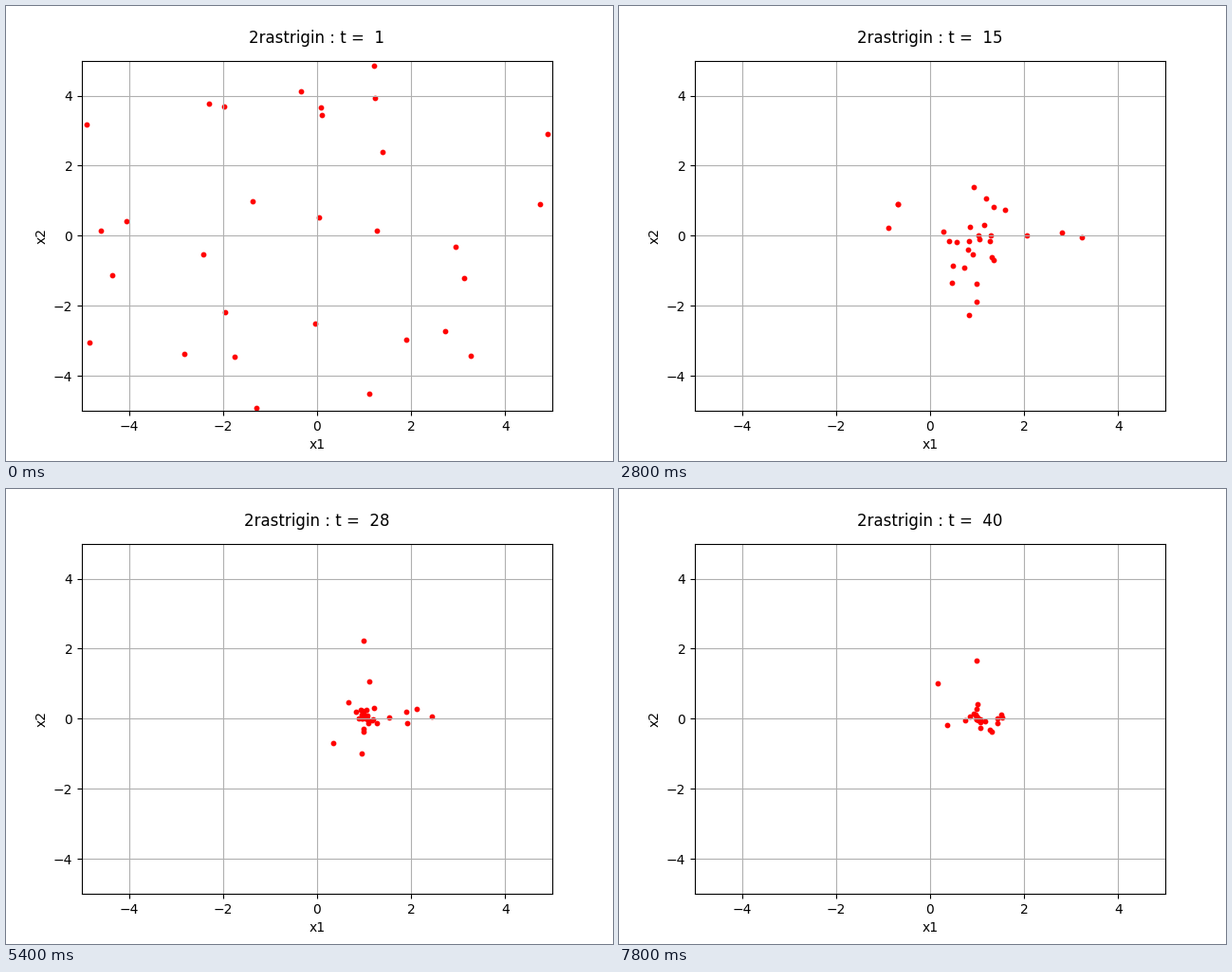
Animation, 640 px wide and 480 px high, one loop 8000 ms. Source, as a matplotlib script:

```python
import numpy as np
import matplotlib.pyplot as plt
from matplotlib.animation import FuncAnimation

COUNT, STEPS, INTERVAL = 30, 40, 200
BEST = np.array([1.0, 0.0])

# Each particle swings around the best point; some settle far later than others
rng = np.random.default_rng(7)
start = rng.uniform(-4.95, 4.95, (COUNT, 2))
speed = rng.uniform(.6, 2.2, (COUNT, 2))
decay = np.linspace(.02, .13, COUNT)[:, None]


def swarm(step):
    swing = np.exp(-decay * step) * np.cos(speed * step)
    return BEST + (start - BEST) * swing


fig, ax = plt.subplots(figsize=(6.4, 4.8), dpi=100)
ax.set(xlim=(-5, 5), ylim=(-5, 5), xlabel="x1", ylabel="x2")
ax.grid(True)
dots = ax.scatter(*start.T, s=10, c="red")
title = ax.text(.5, 1.05, "", transform=ax.transAxes, ha="center", fontsize=12)


def draw(step):
    dots.set_offsets(swarm(step))
    title.set_text(f"2rastrigin : t =  {step + 1}")
    return dots, title


anim = FuncAnimation(fig, draw, frames=STEPS, interval=INTERVAL,
                     repeat=True, repeat_delay=0)
plt.show()
```
